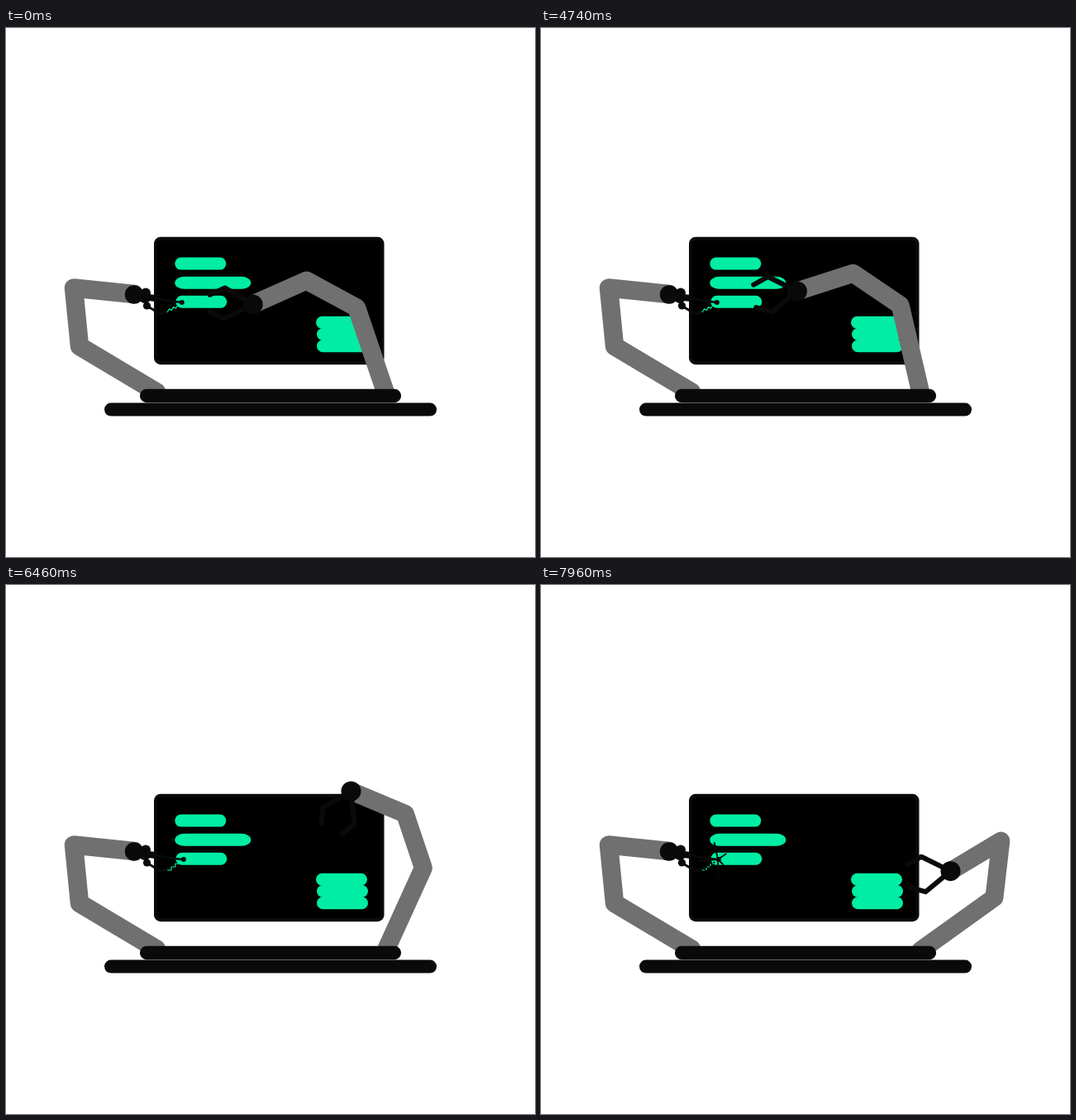
An HTML page with a canvas that plays this animation: 640 by 640 pixels, repeating every 8 s.

```html
<!DOCTYPE html>
<html lang="en">
<head>
<meta charset="utf-8">
<title>Robot arms at a laptop</title>
<style>
  html, body { margin: 0; width: 100%; height: 100%; overflow: hidden; background: #fff; }
  canvas { display: block; width: 640px; height: 640px; }
</style>
</head>
<body>
<canvas id="stage" width="640" height="640"></canvas>
<script>
const ctx = document.getElementById('stage').getContext('2d');
const LOOP = 8000, BEAT = 560, STEPS = [0, 120, 260, 300, 440];
const DARK = '#0a0a0a', GREEN = '#00eda3', GREY = '#707070';
const START = 4480, TURN = 6660, END = 7960;
const TIP = [214, 332];

// Linear run from a at t0 to b at t1, held outside
function ramp(t, t0, t1, a, b) {
  const p = Math.min(1, Math.max(0, (t - t0) / (t1 - t0)));
  return a + (b - a) * p;
}

// Two linear runs that meet at value b
const swing = (t, mid, a, b, c) => t < mid ? ramp(t, START, mid, a, b) : ramp(t, mid, END, b, c);

function random(seed) {
  const v = Math.sin(seed * 12.9898) * 43758.5453;
  return v - Math.floor(v);
}

function polar([x, y], deg, len) {
  const a = deg * Math.PI / 180;
  return [x + len * Math.cos(a), y + len * Math.sin(a)];
}

function line(points, width, color, cap = 'round') {
  ctx.beginPath();
  points.forEach(p => ctx.lineTo(...p));
  ctx.lineWidth = width;
  ctx.strokeStyle = color;
  ctx.lineCap = cap;
  ctx.lineJoin = 'round';
  ctx.stroke();
}

function dot([x, y], r) {
  ctx.beginPath();
  ctx.arc(x, y, r, 0, Math.PI * 2);
  ctx.fillStyle = DARK;
  ctx.fill();
}

function box(x, y, w, h, r, color) {
  ctx.beginPath();
  ctx.roundRect(x, y, w, h, r);
  ctx.fillStyle = color;
  ctx.fill();
}

function screen() {
  box(179, 252.8, 278.5, 154.4, 8, DARK);
  box(182.5, 257, 271, 146, 5, '#000');
  [62, 92, 62].forEach((w, i) => {
    box(204.3 + i % 2 * -0.5 + i * 0.5, 277.6 + i * 23.1, w, 15, [{ x: 7.5 + i % 2 * 4, y: 7.5 }], GREEN);
  });
  for (let i = 0; i < 3; i++) {
    box(375 + Math.min(i, 1), 348.8 + i * 14.3, 62, 14.8, 7.4, GREEN);
  }
}

function rightArm(t) {
  const base = [459.5, 442];
  const fore = swing(t, TURN, -204, -152.5, -211);
  const elbow = polar(base, swing(t, 7020, -108.8, -53.3, -35.7), 109.5);
  const knuckle = polar(elbow, swing(t, 7840, -151.6, -78.5, -83.4), 69);
  const hand = polar(knuckle, fore, 71);
  line([hand, knuckle, elbow, base], 22, GREY);

  const mid = fore + swing(t, TURN, 26, -97, 24.3);
  const open = ramp(t, START, 4740, 28.5, 33);
  for (const side of [1, -1]) {
    const dir = mid + side * open;
    const joint = polar(hand, dir, 39.3);
    line([hand, joint, polar(joint, dir - side * 55, 20)], 6, DARK);
  }
  dot(hand, 12);
}

function leftArm(n) {
  line([[155, 322], [82, 314.5], [89, 385], [182, 440.5]], 22.5, GREY);
  dot([155, 322.5], 11.2);
  dot([168, 326], 7);
  dot([169, 320.5], 6);
  dot([170.5, 336], 4.6);
  line([[168, 325.5], [181, 327]], 8, DARK, 'butt');
  line([[180, 326], [196, 330], [213, 332]], 2.6, DARK);
  line([[170, 336], [187, 346], [197, 343]], 3, DARK);
  sparks(n);
}

// Green wire, either a zigzag or a staircase
function wire(stairs) {
  return Array.from({ length: 6 }, (_, i) => stairs
    ? [195 + 5 * Math.ceil(i / 2), 345 - 4 * Math.floor(i / 2)]
    : [195 + 2.6 * i, 344 - 1.2 * i - i % 2 * 3]);
}

function sparks(n) {
  const stairs = n % 5 % 2 === 1;
  const burst = n % 8 > 4;
  if (burst) {
    for (let i = 0; i < 5; i++) {
      const seed = n * 31 + i * 7;
      const angle = (i + random(seed)) * 72;
      line([TIP, polar(TIP, angle, 7 + 20 * random(seed + 1) ** 2)], 1.8, DARK);
      dot(polar(TIP, 110 + angle / 3, 4 + 9 * random(seed + 2)), 1.3);
    }
    ctx.setLineDash([3, 2]);
  }
  line(wire(stairs), 1.2, GREEN, 'butt');
  ctx.setLineDash([]);
  dot([stairs ? 214.8 : 212.8, 332], 3);
}

function draw(now) {
  const t = now % LOOP;
  const beat = Math.floor(t / BEAT), rest = t - beat * BEAT;
  const step = STEPS.filter(s => s <= rest).length - 1;
  ctx.fillStyle = '#fff';
  ctx.fillRect(0, 0, 640, 640);
  screen();
  rightArm(beat * BEAT + STEPS[step]);
  leftArm(beat * STEPS.length + step);
  box(162, 436.8, 316, 16.4, 8, DARK);
  box(119, 453.6, 402, 16, 8, DARK);
}

const start = performance.now();
function tick() {
  draw(performance.now() - start);
  requestAnimationFrame(tick);
}
tick();
</script>
</body>
</html>
```
